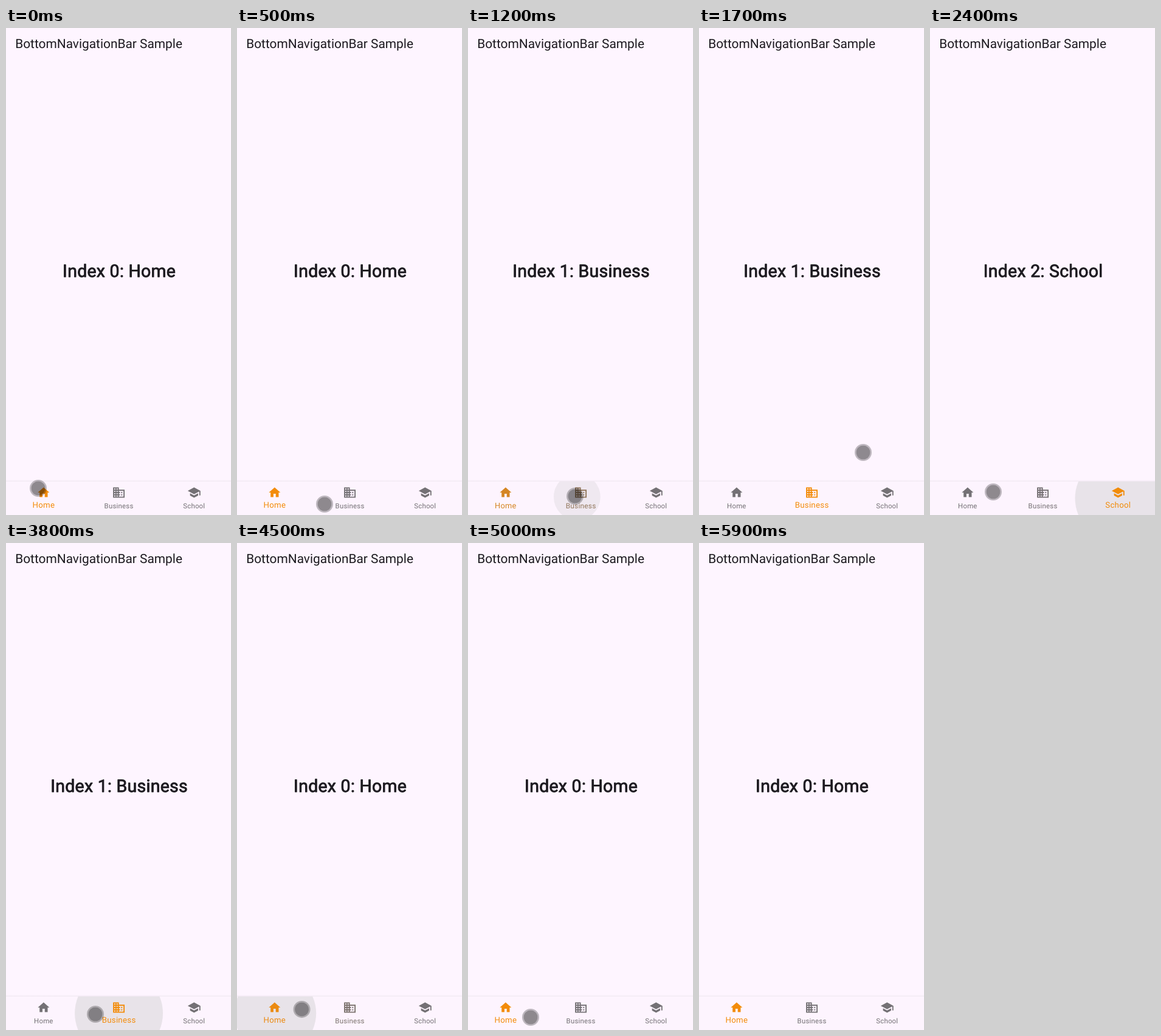
Recreate the animation shown at these times as an HTML page. Size 370 by 802 pixels, loop 7 s.

```html
<!DOCTYPE html>
<html lang="en">
<head>
<meta charset="utf-8">
<title>BottomNavigationBar Sample</title>
<style>
html, body { margin: 0; width: 100%; height: 100%; overflow: hidden; background: #fef5ff; }
svg { display: block; width: 370px; height: 802px; font-family: Roboto, sans-serif; }
text { fill: #1d1b20; text-rendering: geometricPrecision; }
.title { font-size: 22px; }
.page { font-size: 30px; letter-spacing: .3px; text-anchor: middle; stroke: #1d1b20; stroke-width: .95; stroke-linejoin: round; }
.tab path { fill-rule: evenodd; }
.tab text { font-size: 14px; letter-spacing: .28px; text-anchor: middle; fill: inherit; }
</style>
</head>
<body>
<svg viewBox="0 0 370 802">
  <defs>
    <linearGradient id="shade" x1="0" y1="0" x2="0" y2="1">
      <stop offset="0" stop-color="#000" stop-opacity="0"/>
      <stop offset="1" stop-color="#000" stop-opacity=".06"/>
    </linearGradient>
    <clipPath id="barClip"><rect y="787.2" width="391" height="60"/></clipPath>
  </defs>
  <rect width="370" height="802" fill="#fef5ff"/>
  <g id="app" transform="scale(.94872)">
    <text class="title" x="16" y="34.9">BottomNavigationBar Sample</text>
    <text class="page" id="page" x="196.2" y="431.9"></text>
    <rect y="784.4" width="391" height="2.9" fill="url(#shade)"/>
    <rect y="787.2" width="391" height="60" fill="#fdf4fe"/>
    <g clip-path="url(#barClip)"><circle id="ripple" fill="#c8c8c8"/></g>
  </g>
  <g id="pointer">
    <circle r="12.75" fill="none" stroke="#000" stroke-opacity=".25" stroke-width="2.5"/>
    <circle r="11.5" fill="#000" fill-opacity=".44"/>
  </g>
</svg>
<script>
const LOOP = 7000, STEP = 100, SCALE = .94872, POINTER_END = 5900;
const BAR_TOP = 787.35, BAR_H = 58, TAB_W = 130.4, LABEL_BOTTOM = 838.35;
const ACTIVE = [243, 140, 10], IDLE = [116, 113, 117];

const box = (x, y, w, h) => `M${x} ${y}h${w}v${h}h${-w}z`;

// Two blocks; overlapping boxes cut windows out (even-odd fill).
function officeIcon() {
  let d = box(2, 3, 10, 18) + box(12, 7, 10, 14) + box(12, 9, 8, 10);
  for (let y = 5; y < 20; y += 4) d += box(4, y, 2, 2) + box(8, y, 2, 2);
  for (let y = 11; y < 18; y += 4) d += box(12, y, 2, 2) + box(16, y, 2, 2);
  return d;
}

const tabs = [
  { name: 'Home', icon: 'M10 20v-6h4v6h5v-8h3L12 3 2 12h3v8z' },
  { name: 'Business', icon: officeIcon() },
  { name: 'School', icon: 'M5 13.2v4L12 21l7-3.8v-4L12 17zM12 3L1 9l11 6 9-4.9V17h2V9z' }
];

// [time, tab]
const taps = [[1150, 1], [2230, 2], [3580, 1], [4360, 0]];

// Turning points and rests of the pointer: [time, x, y]
const path = [
  [0, 53, 758], [500, 144, 784], [700, 215, 780], [900, 176, 771], [1200, 176, 771],
  [1500, 302, 692], [1700, 270, 699], [1900, 211, 747], [2100, 302, 776], [2250, 302, 776],
  [2400, 104, 764], [2500, 89, 768], [2700, 191, 787], [3500, 191, 787], [3800, 147, 776],
  [4100, 71, 769], [4400, 73, 774], [4800, 283, 735], [5000, 103, 781], [5200, 175, 740],
  [5800, 362, 15]
];

const $ = id => document.getElementById(id);
const clamp = v => Math.min(1, Math.max(0, v));
const lerp = (a, b, k) => a + (b - a) * k;
const tabX = i => TAB_W * (i + .5);

function bezier(x1, y1, x2, y2) {
  const at = (a, b, u) => 3 * a * u * (1 - u) ** 2 + 3 * b * u * u * (1 - u) + u ** 3;
  return v => {
    if (v <= 0 || v >= 1) return clamp(v);
    let lo = 0, hi = 1;
    for (let i = 0; i < 24; i++) {
      const mid = (lo + hi) / 2;
      if (at(x1, x2, mid) < v) lo = mid; else hi = mid;
    }
    return at(y1, y2, lo);
  };
}
const ease = bezier(.25, .1, .25, 1);
const fastOutSlowIn = bezier(.4, 0, .2, 1);

function set(el, attrs) {
  for (const key in attrs) el.setAttribute(key, attrs[key]);
}
function make(tag, parent, attrs) {
  const el = document.createElementNS('http://www.w3.org/2000/svg', tag);
  set(el, attrs);
  return parent.appendChild(el);
}

tabs.forEach((tab, i) => {
  tab.group = make('g', $('app'), { class: 'tab' });
  make('path', tab.group, { d: tab.icon, transform: `translate(${tabX(i) - 12} ${BAR_TOP + 7})` });
  tab.label = make('text', tab.group, { y: -5.2 });
  tab.label.textContent = tab.name;
});

// Slope at a key point: flat at turns and rests, else a mean of both sides.
function slope(i, axis) {
  if (i === 0 || i === path.length - 1) return 0;
  const side = j => (path[j + 1][axis] - path[j][axis]) / (path[j + 1][0] - path[j][0]);
  const a = side(i - 1), b = side(i);
  return a * b > 0 ? 2 * a * b / (a + b) : 0;
}

function pointerAt(t) {
  const i = path.findIndex(p => p[0] > t);
  if (i < 0) return path[path.length - 1].slice(1);
  const a = path[i - 1], b = path[i], span = b[0] - a[0], k = (t - a[0]) / span;
  return [1, 2].map(axis =>
    lerp(a[axis], b[axis], k * k * (3 - 2 * k)) +
    span * k * (1 - k) * (slope(i - 1, axis) * (1 - k) - slope(i, axis) * k));
}

function drawRipple(t, tap) {
  const age = tap ? t - tap[0] : LOOP;
  const alpha = .4 * clamp(age / 75) * (1 - clamp((age - 225) / 150));
  set($('ripple'), { opacity: alpha });
  if (!alpha) return;
  const k = ease(age / 225);
  const [x, y] = pointerAt(tap[0]);
  const full = Math.hypot(TAB_W, BAR_H) / 2;
  set($('ripple'), {
    cx: lerp(x / SCALE, tabX(tap[1]), k),
    cy: lerp(y / SCALE, BAR_TOP + BAR_H / 2, k),
    r: lerp(full * .3, full + 5, k)
  });
}

function draw(t) {
  const done = taps.filter(p => p[0] <= t);
  const tap = done[done.length - 1];
  const now = tap ? tap[1] : 0;
  const before = done.length > 1 ? done[done.length - 2][1] : 0;
  const k = tap ? fastOutSlowIn((t - tap[0]) / 200) : 1;

  $('page').textContent = `Index ${now}: ${tabs[now].name}`;
  tabs.forEach((tab, i) => {
    const on = i === now ? k : i === before ? 1 - k : 0;
    const color = IDLE.map((c, n) => Math.round(lerp(c, ACTIVE[n], on)));
    set(tab.group, { fill: `rgb(${color})` });
    set(tab.label, { transform: `translate(${tabX(i)} ${LABEL_BOTTOM}) scale(${lerp(12 / 14, 1, on)})` });
  });
  drawRipple(t, tap);

  const [x, y] = pointerAt(t);
  set($('pointer'), { transform: `translate(${x} ${y})`, visibility: t < POINTER_END ? 'visible' : 'hidden' });
}

const start = performance.now();
function tick() {
  const t = (performance.now() - start) % LOOP;
  draw(Math.floor(t / STEP) * STEP);
  requestAnimationFrame(tick);
}
tick();
</script>
</body>
</html>
```
